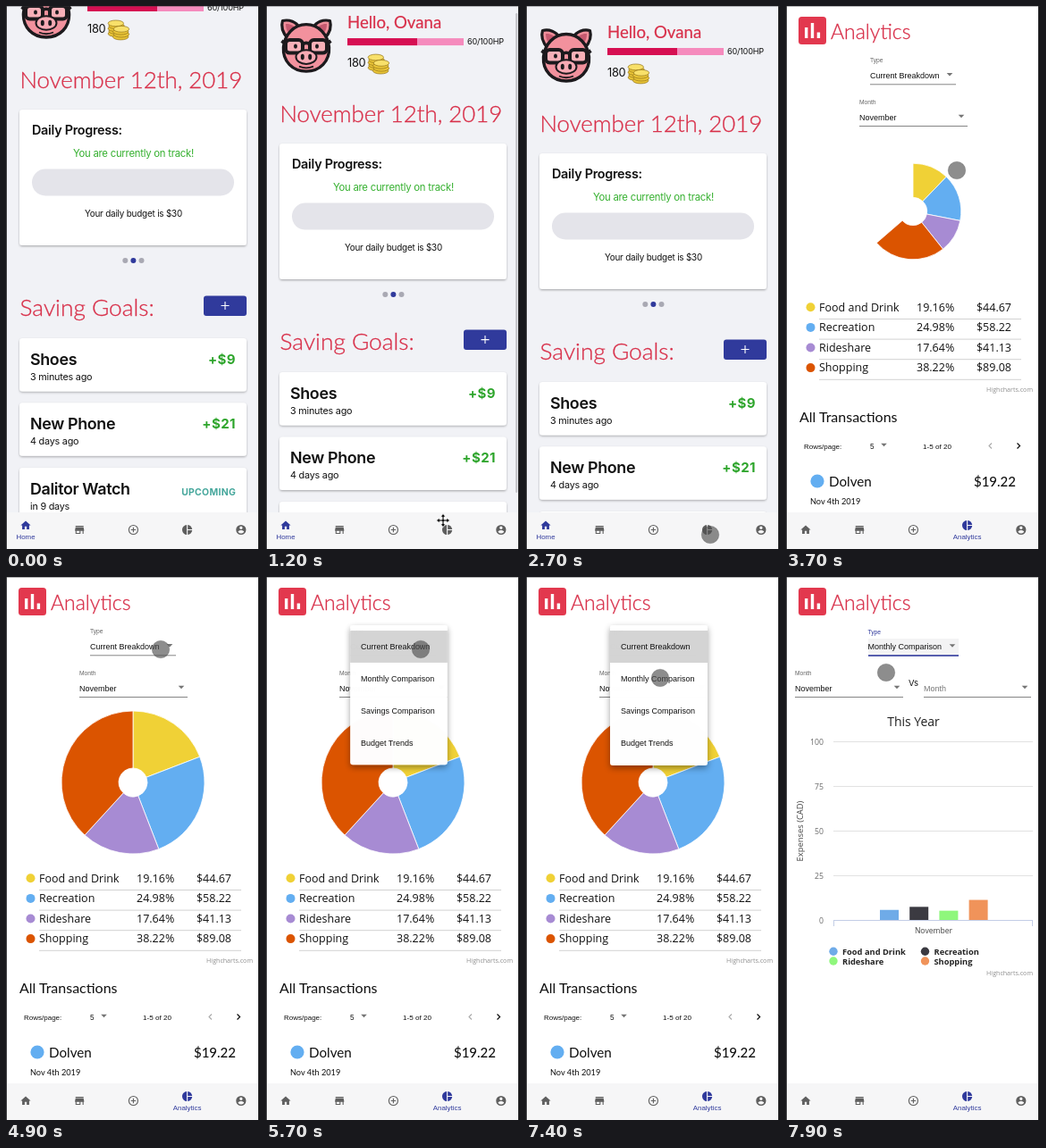
Write an HTML page that moves like this. It is 284x608 px and loops after 8 s.

```html
<!DOCTYPE html>
<html lang="en">
<head>
<meta charset="utf-8">
<title>Savings app</title>
<style>
html, body { margin: 0; width: 100%; height: 100%; overflow: hidden; background: #fff; }
svg { display: block; width: 284px; height: 608px; }
.ui { font-family: Inter, sans-serif; letter-spacing: -.02em; }
.md { font-family: Inter, sans-serif; letter-spacing: -.02em; font-weight: 600; }
.bd { font-family: Inter, sans-serif; letter-spacing: .03em; font-weight: 700; }
.thin { font-family: Lato, sans-serif; font-weight: 300; stroke: #d8304a; stroke-width: .3; }
.hello { font-family: Lato, sans-serif; stroke: #d8304a; stroke-width: .2; }
.lato { font-family: Lato, sans-serif; }
.arial { font-family: "Liberation Sans", Arial, sans-serif; }
.chart { font-family: "Open Sans", sans-serif; }
.heavy { font-family: "Open Sans", sans-serif; font-weight: 700; }
</style>
</head>
<body>
<svg id="stage" viewBox="0 0 284 608" xmlns="http://www.w3.org/2000/svg"></svg>
<script>
const LOOP = 8000;
const BLUE = '#303a9c', GREEN = '#35b02f', GREY = '#666', RED = '#d8304a';

const clamp = v => Math.max(0, Math.min(1, v));
const span = (t, a, b) => clamp((t - a) / (b - a));
const sine = p => (1 - Math.cos(Math.PI * p)) / 2;
const easeOut = p => 1 - (1 - p) ** 3;

const text = (x, y, s, size, cls, fill = '#111', anchor = 'start', more = '') =>
  `<text x="${x}" y="${y}" font-size="${size}" class="${cls}" fill="${fill}" text-anchor="${anchor}" ${more}>${s}</text>`;
const rect = (x, y, w, h, fill, r = 0, more = '') =>
  `<rect x="${x}" y="${y}" width="${w}" height="${h}" rx="${r}" fill="${fill}" ${more}/>`;
const dot = (x, y, r, fill, more = '') => `<circle cx="${x}" cy="${y}" r="${r}" fill="${fill}" ${more}/>`;
const oval = (x, y, rx, ry, fill, more = '') =>
  `<ellipse cx="${x}" cy="${y}" rx="${rx}" ry="${ry}" fill="${fill}" ${more}/>`;
const line = (x1, y1, x2, y2, stroke, w = 1) =>
  `<path d="M${x1} ${y1}L${x2} ${y2}" stroke="${stroke}" stroke-width="${w}"/>`;
const path = (d, fill, more = '') => `<path d="${d}" fill="${fill}" ${more}/>`;
const group = (id, body, more = '') => `<g id="${id}" ${more}>${body}</g>`;
const caret = (x, y) => path(`M${x - 3.3} ${y - 1.7}h6.6l-3.3 3.4z`, '#757575');
const card = (y, h) => rect(15, y, 254, h, '#fff', 3.5, 'filter="url(#lift)"');

function pig() {
  const ink = w => `stroke="#1c1a1d" stroke-width="${w}" stroke-linejoin="round"`;
  const flip = s => s + `<g transform="matrix(-1 0 0 1 90 0)">${s}</g>`;
  const ear = path('M18.5 27.5C26 25.5 34 29 37 35L24 47C19 41 16.5 34 18.5 27.5Z', '#f08f9b', ink(3.2)) +
    path('M22 31C27 30.5 31 33 33 36L26 42C23 39 22 35 22 31Z', '#c65a70');
  const lens = rect(22, 49, 19, 14.5, '#f7b0b8', 4.5, ink(4)) + oval(33, 56, 2, 2.6, '#1c1a1d');
  return flip(ear) +
    path('M45 31.5C59 31.5 69 43 70.5 57C71.5 73 60 84 45 84C30 84 18.500 73 19.500 57C21 43 31 31.500 45 31.500Z', '#f2919d', ink(3.4)) +
    flip(path('M17.5 50L22 53', 'none', ink(4)) + lens) + path('M41 54Q45 50.500 49 54', 'none', ink(3.6)) +
    oval(45, 68, 11.5, 7.8, '#f6a9b3', ink(2)) + flip(oval(40.8, 68, 2, 3.3, '#1c1a1d')) +
    path('M37 78.500Q45 82 53 78.500', 'none', ink(1.8));
}

function coins(x, y, n) {
  let s = '';
  for (let i = 0; i < n; i++)
    s += oval(x + (i % 2) * .8, y - i * 2.9, 8.7, 3.4, i < n - 1 ? '#e9c436' : '#f8e06a', 'stroke="#94741a" stroke-width=".7"');
  return s;
}

function goal(y, name, when, gain) {
  const soon = gain === 'UPCOMING';
  return card(y, 59.5) + text(27, y + 30, name, 17.9, 'md') + text(27, y + 47, when, 10.8, 'ui') +
    text(257, y + (soon ? 31 : 28.5), gain, soon ? 10.4 : 15, 'bd', soon ? '#46a79c' : '#2ea52c', 'end');
}

function home() {
  return pig() + text(91, 36, 'Hello, Ovana', 18.6, 'hello', RED) +
    rect(91, 47, 130, 8, '#f58bbd') + rect(91, 47, 78, 8, '#d60f52') +
    text(225, 54.3, '60/100HP', 9.1, 'ui') +
    text(91, 78.7, '180', 12.8, 'ui') + coins(122.8, 80, 5) + coins(128.2, 83.5, 4) +
    text(15.5, 140.5, 'November 12th, 2019', 25.8, 'thin', RED) +
    card(165, 152) + text(29, 193, 'Daily Progress:', 14.4, 'md') +
    text(142.5, 218, 'You are currently on track!', 11.3, 'ui', GREEN, 'middle') +
    rect(29, 231.5, 226, 30, '#e4e4ea', 15) +
    text(142.5, 285, 'Your daily budget is $30', 9.9, 'ui', '#111', 'middle') +
    dot(133.3, 334, 3, '#a9a9b3') + dot(142.4, 334, 3, BLUE) + dot(151.5, 334, 3, '#a9a9b3') +
    text(15.5, 395.5, 'Saving Goals:', 26.3, 'thin', RED) +
    rect(221, 373.5, 48, 22.5, BLUE, 3) +
    path('M240.5 384.5h9M245 380v9', 'none', 'stroke="#fff" stroke-width="1.1"') +
    goal(421, 'Shoes', '3 minutes ago', '+$9') +
    goal(493.3, 'New Phone', '4 days ago', '+$21') +
    goal(566, 'Dalitor Watch', 'in 9 days', 'UPCOMING');
}

const spend = [
  ['Food and Drink', 19.16, 44.67, '#f0d136', '#6fabe8'],
  ['Recreation', 24.98, 58.22, '#63aef1', '#3b3a41'],
  ['Rideshare', 17.64, 41.13, '#a78bd3', '#8ff77c'],
  ['Shopping', 38.22, 89.08, '#db5400', '#f0935a']
];

const credit = y => text(276, y, 'Highcharts.com', 7.1, 'chart', '#8f8f8f', 'end');

function field(x, w, y, label, value) {
  return text(x, y - 18, label, 6.7, 'arial', GREY) + text(x, y, value, 9, 'arial') +
    line(x, y + 6.5, x + w, y + 6.5, '#858585') + caret(x + w - 7, y - 4.5);
}

const header = rect(14, 12, 31, 31, '#e2384e', 3.5) +
  [[21, 24], [27.8, 19], [34.7, 29.5]].map(([x, y]) => rect(x, y, 3.4, 36 - y, '#fff')).join('') +
  text(50, 36.8, 'Analytics', 23, 'thin', RED);

function table() {
  const rows = spend.map(([name, part, cost, fill], i) => {
    const y = 337 + i * 22.6;
    return dot(27.5, y + .3, 5, fill) + text(37, y + 4.6, name, 12.5, 'chart') +
      text(146, y + 4.6, part + '%', 12.5, 'chart') + text(252, y + 4.6, '$' + cost, 12.5, 'chart', '#111', 'end') +
      line(37, y + 13.5, 263, y + 13.5, '#d2d2d2');
  }).join('');
  return rows + credit(432) + text(15, 465.5, 'All Transactions', 16, 'lato') +
    text(20, 495.6, 'Rows/page:', 8, 'arial') + text(94, 495.6, '5', 8.2, 'arial') + caret(109.5, 491.5) +
    text(153, 495.6, '1-5 of 20', 8.1, 'arial') +
    path('M230 489.5l-3 3 3 3', 'none', 'stroke="#aaa" stroke-width="1.1"') +
    path('M258.5 489.5l3 3-3 3', 'none', 'stroke="#111" stroke-width="1.3"') +
    dot(35, 532, 7.6, '#63aef1') + text(48, 537.8, 'Dolven', 15.2, 'lato') +
    text(257, 537.5, '$19.22', 15, 'lato', '#111', 'end', 'font-weight="500"') +
    text(27, 558, 'Nov 4th 2019', 9.2, 'lato');
}

function yearChart() {
  let s = text(142.5, 167, 'This Year', 14, 'chart', '#222', 'middle');
  for (let v = 0; v <= 100; v += 25) {
    const y = 384.5 - v * 2;
    s += line(53, y, 276, y, v ? '#e2e2e2' : '#c3cde6') + text(42, y + 3.2, v, 8.7, 'chart', GREY, 'end');
  }
  s += path('M53.5 384v7M275.5 384v7', 'none', 'stroke="#c3cde6"') +
    text(0, 0, 'Expenses (CAD)', 9.4, 'chart', '#444', 'middle', 'transform="translate(19 284.5) rotate(-90)"') +
    text(165, 398.6, 'November', 8.6, 'chart', '#444', 'middle');
  spend.forEach(([name, , , , fill], i) => {
    const x = i % 2 ? 155.5 : 53, y = i < 2 ? 419.3 : 430;
    s += `<rect class="bar" x="${105 + i * 33.2}" width="21" fill="${fill}"/>` +
      dot(x, y, 4.7, fill) + text(x + 10, y + 3.5, name, 9.3, 'heavy', '#222');
  });
  return s + credit(446);
}

function compare() {
  return rect(92, 69, 101, 19, '#f3f3f4') + text(91.5, 64, 'Type', 6.7, 'arial', BLUE) +
    text(91.5, 81.3, 'Monthly Comparison', 9, 'arial') + rect(92, 87.2, 101, 1.6, BLUE) + caret(186, 77) +
    field(10, 121, 128, 'Month', 'November') + text(137, 122, 'Vs', 9.5, 'ui') +
    text(154, 128, 'Month', 9, 'arial', '#777') + line(154, 134.5, 274, 134.5, '#858585') + caret(267, 123.5);
}

function menu() {
  const items = ['Current Breakdown', 'Monthly Comparison', 'Savings Comparison', 'Budget Trends'];
  return rect(94, 54, 109, 157, '#fff', 3, 'filter="url(#float)"') + rect(94, 60, 109, 36, '#d4d4d4') +
    items.map((s, i) => text(106, 81.3 + i * 36, s, 9, 'arial')).join('');
}

const icons = [
  'M10 20v-6h4v6h5v-8h3L12 3 2 12h3v8z',
  'M20 4H4v2h16V4zm1 10v-2l-1-5H4l-1 5v2h1v6h10v-6h4v6h2v-6h1zm-9 4H6v-4h6v4z',
  'M13 7h-2v4H7v2h4v4h2v-4h4v-2h-4V7zm-1-5a10 10 0 1 0 0 20 10 10 0 0 0 0-20zm0 18a8 8 0 1 1 0-16 8 8 0 0 1 0 16z',
  'M11 2v20c-5.07-.5-9-4.79-9-10s3.93-9.5 9-10zm2.03 0v8.99H22c-.47-4.74-4.24-8.52-8.97-8.99zm0 11.01V22c4.74-.47 8.5-4.25 8.97-8.99z',
  'M12 2a10 10 0 1 0 0 20 10 10 0 0 0 0-20zm0 3a3 3 0 1 1 0 6 3 3 0 0 1 0-6zm0 14.2c-2.5 0-4.71-1.28-6-3.22.03-1.99 4-3.08 6-3.08s5.97 1.09 6 3.08c-1.29 1.94-3.5 3.22-6 3.22z'
];

function nav(active, label) {
  return rect(0, 567, 284, 41, '#f6f6f7') + icons.map((d, i) => {
    const x = 22 + i * 60.2, on = i === active;
    return path(d, on ? BLUE : '#5f5f5f', `transform="translate(${x - 6.7} ${(on ? 581.5 : 586.5) - 6.7}) scale(.56)"`) +
      (on ? text(x, 597, label, 7.9, 'arial', BLUE, 'middle') : '');
  }).join('');
}

const arrows = 'M0-7.5L3-4H1V-1H4V-3L7.5 0 4 3V1H1V4H3L0 7.5-3 4H-1V1H-4V3L-7.5 0-4-3V-1H-1V-4H-3Z';

const $ = id => document.getElementById(id);
$('stage').innerHTML = `<defs>
  <filter id="lift" x="-10%" y="-10%" width="120%" height="130%"><feDropShadow dx="0" dy="1.2" stdDeviation=".9" flood-opacity=".3"/></filter>
  <filter id="float" x="-20%" y="-20%" width="140%" height="140%"><feDropShadow dx="0" dy="3" stdDeviation="3.5" flood-opacity=".38"/></filter></defs>` +
  group('home', rect(0, 0, 284, 608, '#f1f2f6') + group('scroll', home()) +
    rect(279, 8, 2.4, 537, '#c6c6ca', 1.2, 'id="thumb"') + nav(0, 'Home')) +
  group('stats', rect(0, 0, 284, 608, '#fff') + header +
    group('breakdown', field(94, 96, 81.3, 'Type', 'Current Breakdown') + field(82, 121, 128, 'Month', 'November') +
      group('loaded', table() + group('pie', ''))) +
    group('compare', compare() + group('year', yearChart())) + nav(3, 'Analytics')) +
  group('menu', menu()) +
  path(arrows, '#111', 'id="cross" stroke="#fff" stroke-width=".8"') +
  dot(0, 0, 9.8, '#505050', 'id="touch" fill-opacity=".65" stroke="#444" stroke-opacity=".3" stroke-width=".8"') +
  rect(0, 0, 1, 608, '#3a3a3d') + rect(282, 0, 2, 608, '#1c1c1e') + rect(0, 0, 284, .6, '#3a3a3d', 0, 'opacity=".6"');

const bars = document.querySelectorAll('.bar');
const show = (id, on) => $(id).setAttribute('visibility', on ? 'inherit' : 'hidden');
const set = (id, key, v) => $(id).setAttribute(key, v);

// Angles, outer and inner radius all grow together.
function drawPie(p) {
  const r = 8 + 72 * p, hole = 8 + 8 * Math.min(1, p * 1.5);
  const at = (a, d) => `${(142 + d * Math.sin(a)).toFixed(2)} ${(230 - d * Math.cos(a)).toFixed(2)}`;
  let a = 0;
  $('pie').innerHTML = p <= 0 ? '' : spend.map(([, part, , fill]) => {
    const b = a + part / 100 * 2 * Math.PI * p;
    const big = b - a > Math.PI ? 1 : 0;
    const d = `M${at(a, r)}A${r} ${r} 0 ${big} 1 ${at(b, r)}L${at(b, hole)}A${hole} ${hole} 0 ${big} 0 ${at(a, hole)}Z`;
    a = b;
    return path(d, fill, 'stroke="#fff" stroke-width=".8"');
  }).join('');
}

const stops = [
  [1900, 198, 576], [2500, 206, 592], [2900, 206, 592], [3700, 191, 184], [4700, 173, 81],
  [5900, 173, 81], [6350, 177, 115], [6500, 177, 115], [7000, 150, 113], [7400, 150, 113], [7850, 112, 107]
];

function pointer(t) {
  let i = 0;
  while (i < stops.length - 2 && t > stops[i + 1][0]) i++;
  const [t0, x0, y0] = stops[i], [t1, x1, y1] = stops[i + 1];
  const p = sine(span(t, t0, t1));
  return `translate(${x0 + (x1 - x0) * p} ${y0 + (y1 - y0) * p})`;
}

function render(t) {
  const stats = t >= 2800, switched = t >= 7450;
  show('home', !stats);
  show('stats', stats);
  set('scroll', 'transform', `translate(0 ${-49 * (1 - easeOut(span(t, 1000, 1510)))})`);
  set('thumb', 'opacity', t < 1000 ? 0 : 1 - span(t, 1900, 2200));

  show('breakdown', stats && !switched);
  show('loaded', t >= 3200 && !switched);
  if (stats) drawPie(sine(span(t, 3113, 4113)));

  show('compare', switched);
  show('year', t >= 7600);
  const grow = sine(span(t, 7670, 8670));
  bars.forEach((bar, i) => {
    const h = spend[i][2] * 2 * grow;
    bar.setAttribute('y', 384 - h);
    bar.setAttribute('height', h);
  });

  const open = easeOut(span(t, 5500, 5760));
  set('menu', 'opacity', open * (1 - span(t, 7400, 7620)));
  set('menu', 'transform', `translate(148 78) scale(${.75 + .25 * open} ${.5625 + .4375 * open}) translate(-148 -78)`);

  show('cross', t >= 1000 && t < 1900);
  show('touch', t >= 1900);
  set('cross', 'transform', 'translate(198 576)');
  set('touch', 'transform', pointer(t));
}

const start = performance.now();
function tick() {
  render((performance.now() - start) % LOOP);
  requestAnimationFrame(tick);
}
tick();
</script>
</body>
</html>
```
